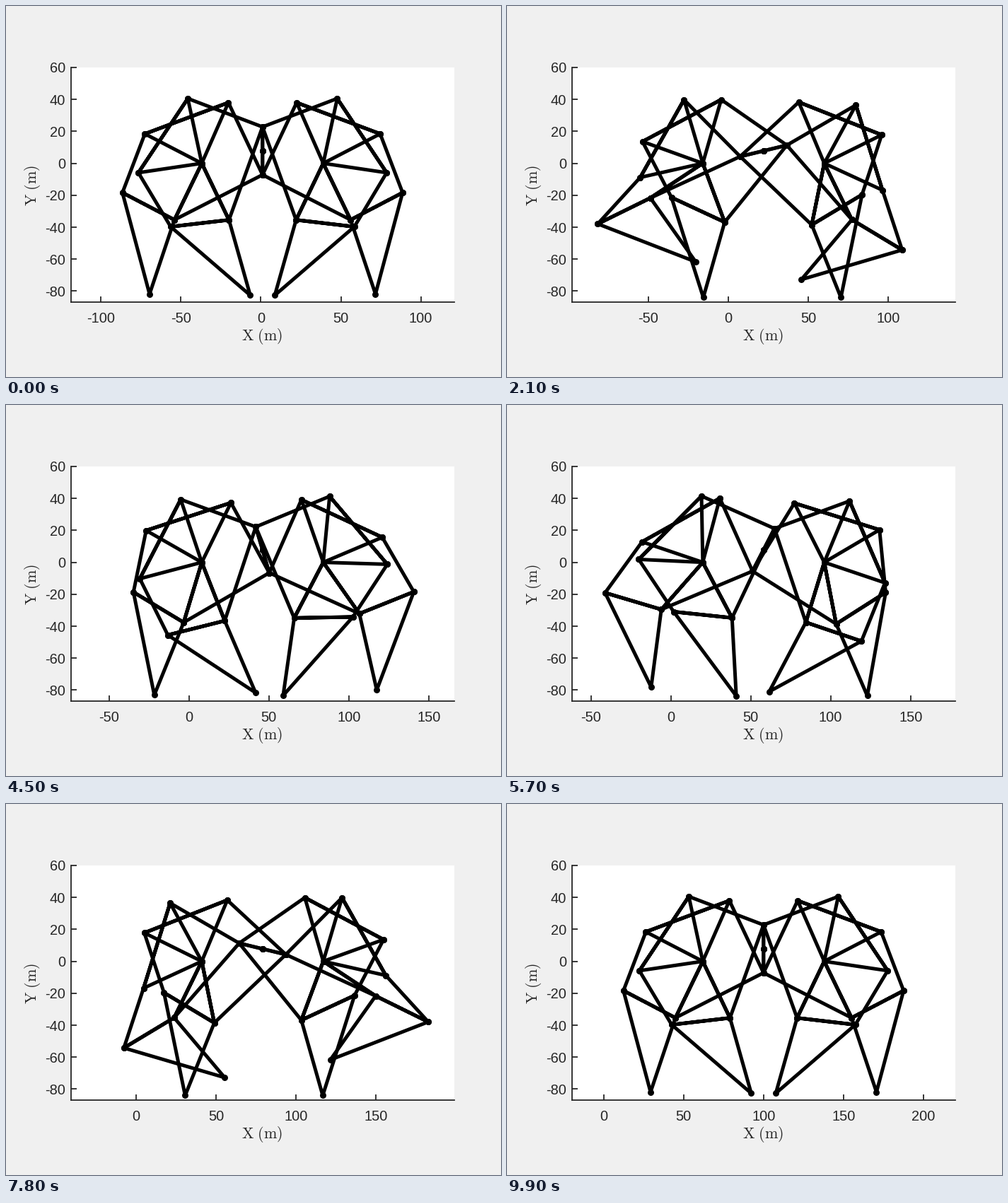
A matplotlib script for the animation above (10000 ms loop, 700x525 px).

```python
import numpy as np
import matplotlib.pyplot as plt
from matplotlib.animation import FuncAnimation
from matplotlib.ticker import MultipleLocator

W, H = 700, 525
DPI = 100
PX = 72 / DPI               # points per pixel
FRAMES = 100
INK = "#262626"

plt.rcParams.update({
    "font.family": "Liberation Sans",
    "mathtext.fontset": "cm",
    "axes.unicode_minus": False,
})

# Jansen linkage proportions
PIVOT = -38 + 0j
HUB = 7.8j
CRANK = 15
b, c, d, e, f, g, h, i, j, k = 41.5, 39.3, 40.1, 55.8, 39.4, 36.7, 65.7, 49, 50, 61.9


def joint(p, q, rp, rq):
    """Point at distance rp from p and rq from q, left of the way from p to q."""
    gap = abs(q - p)
    along = (rp**2 - rq**2 + gap**2) / (2 * gap)
    return p + (along + 1j * np.sqrt(rp**2 - along**2)) * (q - p) / gap


def leg(angle):
    """Path through every bar of the left leg for a crank angle."""
    pin = HUB + CRANK * np.exp(1j * angle)
    top = joint(PIVOT, pin, b, j)
    low = joint(pin, PIVOT, k, c)
    side = joint(PIVOT, top, d, e)
    knee = joint(low, side, g, f)
    foot = joint(low, knee, i, h)
    return np.array([HUB, pin, top, PIVOT, side, top, side, knee, foot,
                     low, knee, low, PIVOT, low, pin])


fig = plt.figure(figsize=(W / DPI, H / DPI), dpi=DPI, facecolor="#f0f0f0")

left, top_edge, width = 91.5, 87, 542.5
height = width * 147 / 240
ax = fig.add_axes([left / W, 1 - (top_edge + height) / H, width / W, height / H])
ax.set_ylim(-87, 60)
ax.xaxis.set_major_locator(MultipleLocator(50))
ax.yaxis.set_major_locator(MultipleLocator(20))
ax.spines[["top", "right"]].set_visible(False)
for name in ("left", "bottom"):
    ax.spines[name].set(color=INK, linewidth=1.8 * PX)
ax.tick_params(direction="in", length=8 * PX, width=1.8 * PX, color=INK,
               labelcolor=INK, labelsize=20 * PX)
ax.tick_params(axis="x", pad=14 * PX)
ax.tick_params(axis="y", pad=7.5 * PX)

label = dict(fontsize=22 * PX, color=INK, ha="center", va="baseline",
             rotation_mode="anchor")
fig.text(362.5 / W, 1 - 473 / H, r"$\mathrm{X\ (m)}$", **label)
fig.text(43 / W, 1 - 253.5 / H, r"$\mathrm{Y\ (m)}$", rotation=90, **label)

# One line per leg: two opposite cranks, each driving a mirrored pair
legs = [(phase, mirror,
         ax.plot([], [], "o-", color="black", lw=5 * PX, ms=9 * PX, mew=0,
                 solid_joinstyle="round")[0])
        for phase in (0, np.pi) for mirror in (1, -1)]


def draw(n):
    x = n + 1
    turn = np.pi / 2 - 2 * np.pi * n / (FRAMES - 1)
    ax.set_xlim(x - 120, x + 120)
    for phase, mirror, line in legs:
        angle = turn + phase
        path = leg(angle if mirror == 1 else np.pi - angle)
        line.set_data(x + mirror * path.real, path.imag)
    return [line for *_, line in legs]


anim = FuncAnimation(fig, draw, frames=FRAMES, interval=100, repeat=True, blit=False)
plt.show()
```
